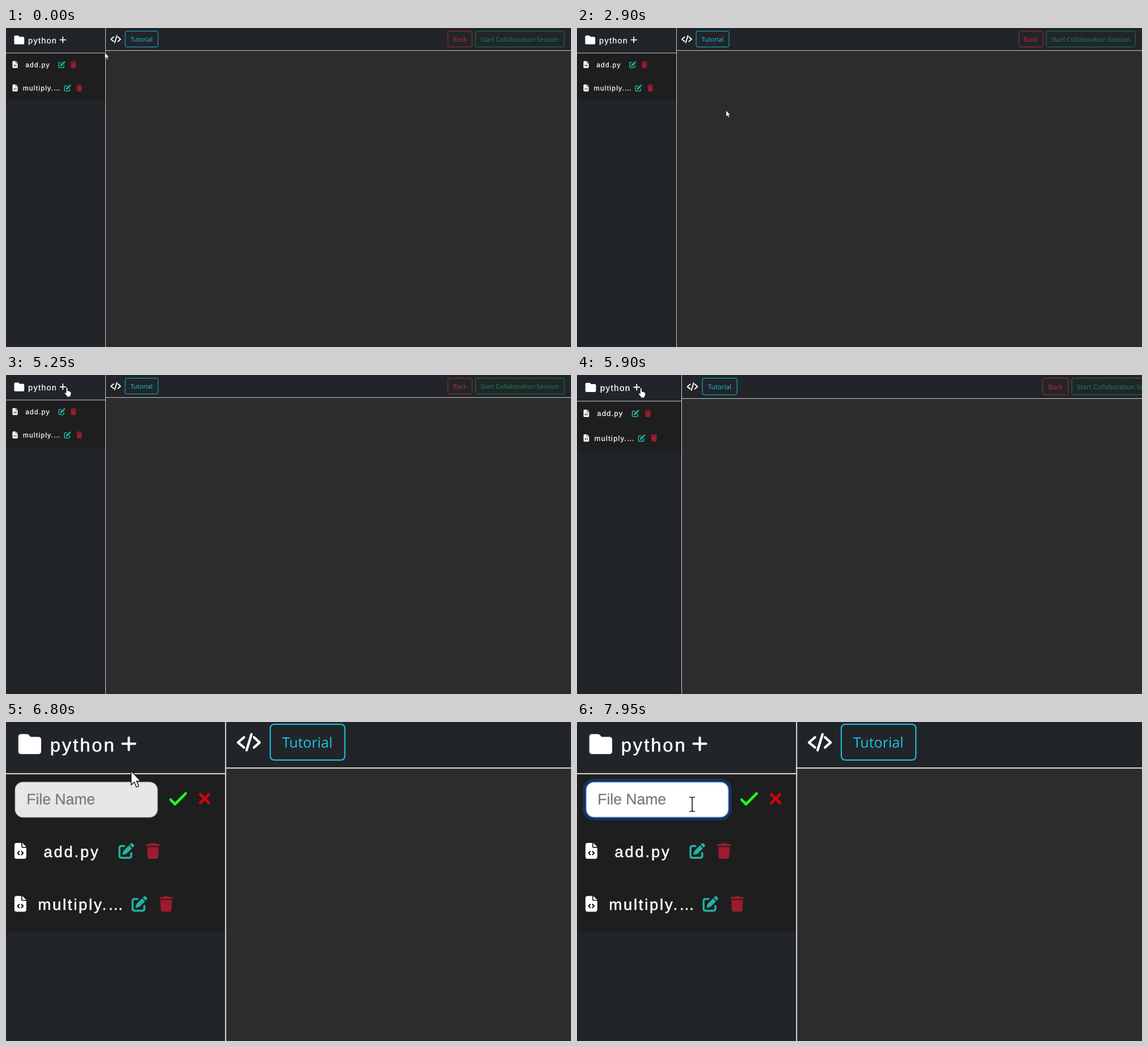
Recreate the animation shown at these times as an HTML page. Size 996 by 562 pixels, loop 8000 ms.

```html
<!DOCTYPE html>
<html lang="en">
<head>
<meta charset="utf-8">
<title>Code editor</title>
<style>
  html, body { margin: 0; width: 100%; height: 100%; overflow: hidden; background: #2d2b2c; }
  svg { display: block; width: 996px; height: 562px; }
  text { text-rendering: geometricPrecision; }
  .file, .head { fill: #fff; stroke: #fff; stroke-width: .25; }
  .file { font: 12px "Liberation Sans", Arial, sans-serif; letter-spacing: 1.25px; }
  .head { font: 14.4px "Liberation Sans", Arial, sans-serif; letter-spacing: 1.3px; }
  .hint { font: 11.7px "Liberation Sans", Arial, sans-serif; fill: #757a80; stroke: #757a80; stroke-width: .12; }
  .btn rect { fill: none; stroke: currentColor; stroke-width: .9; }
  .btn text { font: 11.05px "Open Sans", "Noto Sans", sans-serif; text-anchor: middle; fill: currentColor; }
  .line { fill: none; stroke-linecap: round; stroke-linejoin: round; }
</style>
</head>
<body>
<svg viewBox="0 0 996 562">
  <defs>
    <g id="file" transform="scale(.024)">
      <path fill="#fff" d="M0 64C0 28.7 28.7 0 64 0H224V128c0 17.7 14.3 32 32 32H384V448c0 35.3-28.7 64-64 64H64c-35.3 0-64-28.7-64-64zM384 128H256V0z"/>
      <path class="line" stroke="#1e1e1e" stroke-width="42" d="M153 275l-48 52 48 52M231 275l48 52-48 52"/>
    </g>
    <g id="edit" transform="scale(.0238)" fill="#22b2a2">
      <path d="M471.6 21.7c-21.9-21.9-57.3-21.9-79.2 0l-30.1 30 97.9 97.9 30.1-30.1c21.9-21.9 21.9-57.3 0-79.2zM172.4 241.7c-6.1 6.1-10.8 13.6-13.5 21.9l-29.6 88.8c-5 18 12 36 30.4 30.4l88.8-29.6c8.2-2.7 15.7-7.4 21.9-13.5L437.7 172.3 339.7 74.3z"/>
      <path class="line" stroke="#22b2a2" stroke-width="64" d="M192 96H96q-64 0-64 64V416q0 64 64 64H352q64 0 64-64V320"/>
    </g>
    <path id="trash" transform="scale(.0237)" fill="#9c1c2d" d="M135 18L128 32H32a32 32 0 0 0 0 64H416a32 32 0 0 0 0-64H320l-7-14Q304 0 284 0H164q-20 0-29 18zM416 128H32L53 467q4 45 48 45H347q44 0 48-45z"/>
  </defs>

  <g id="world">
    <rect width="996" height="562" fill="#2d2b2c"/>
    <rect width="996" height="39.5" fill="#212529"/>
    <rect width="175" height="562" fill="#212529"/>
    <rect id="list" y="44" width="175" height="84" fill="#1e1e1e"/>
    <g fill="#dadada">
      <rect x="174.95" width=".9" height="562"/>
      <rect x="175" y="39.2" width="821" height=".9"/>
      <rect y="43.6" width="175" height=".9"/>
    </g>

    <path transform="translate(14.4 12.2) scale(.0347)" fill="#fff" d="M64 480H448q64 0 64-64V160q0-64-64-64H288q-16 0-26-13L243 58Q224 32 192 32H64Q0 32 0 96V416q0 64 64 64z"/>
    <text class="head" x="39.1" y="26.9">python</text>
    <path class="line" stroke="#fff" stroke-width="1.8" d="M95.3 20.8H105.1M100.2 16V25.6"/>
    <path class="line" stroke="#fff" stroke-width="1.9" d="M189.7 15.8L185 19.8l4.7 3.9M195.5 13.4L191.7 25.8M197.4 15.8l4.4 4-4.4 3.9"/>

    <g class="btn" color="#1fc3e6"><rect x="210.1" y="5.7" width="57.9" height="27.7" rx="2.9"/><text x="238.8" y="23.8">Tutorial</text></g>
    <g class="btn" color="#c6283a"><rect x="779" y="5.7" width="42.6" height="27.7" rx="2.9"/><text x="800.2" y="23.8">Back</text></g>
    <g class="btn" color="#1d8555"><rect x="827.6" y="5.7" width="156.6" height="27.7" rx="2.9"/><text x="905.5" y="23.8">Start Collaboration Session</text></g>

    <g id="files">
      <use href="#file" transform="translate(11.4 58.3)"/>
      <text class="file" x="34.2" y="69.1">add.py</text>
      <use href="#edit" transform="translate(92.2 58.4)"/>
      <use href="#trash" transform="translate(113.6 58.4)"/>
      <use href="#file" transform="translate(11.4 99.4)"/>
      <text class="file" x="29.7" y="110.3">multiply.…</text>
      <use href="#edit" transform="translate(102.4 99.5)"/>
      <use href="#trash" transform="translate(123.9 99.5)"/>
    </g>

    <g id="form">
      <rect id="ring" x="9.4" y="47.9" width="115.6" height="32.5" rx="8.5" fill="#1a3256"/>
      <rect id="field" x="12.1" y="50.7" width="110.2" height="27" rx="6" stroke="#ced4da" stroke-width=".7"/>
      <text class="hint" x="20.8" y="67.7">File Name</text>
      <path id="caret" stroke="#222" stroke-width=".7" d="M21.5 57.6V70"/>
      <path class="line" stroke="#1dfb1d" stroke-width="2.1" d="M132.7 64.2l3.4 3.5 8.3-8.3"/>
      <path class="line" stroke="#c8040f" stroke-width="2.3" d="M155.8 60.1l6.6 6.6M162.4 60.1l-6.6 6.6"/>
    </g>

    <g id="cursor">
      <path id="arrow" fill="#fff" stroke="#111" stroke-width=".6" stroke-linejoin="round" d="M.3 .3V11.2L2.7 8.9l1.7 3.9 1.8-.8L4.5 8.2H7.8z"/>
      <path id="hand" transform="translate(-4.1 .2) scale(1.06 1)" fill="#fff" stroke="#111" stroke-width=".3" d="M2.9 1.4Q2.9.3 4 .3T5.1 1.4V5.9Q6.7 5.4 7 6.5 8.4 6 8.8 7.2 10.6 7 10.6 8.6V11Q10.6 13 9.4 14.4V16H4.1V14.8Q3.4 13.8.6 10.6 0 9.3 1 8.8 2 8.6 2.9 9.8z"/>
      <path id="beam" fill="none" stroke="#222" stroke-width=".75" d="M-2.2-5.5H-.8Q0-5.5 0-4.8 0-5.5.8-5.5H2.2M0-4.8V4.8M-2.2 5.5H-.8Q0 5.5 0 4.8 0 5.5.8 5.5H2.2"/>
    </g>
  </g>
</svg>
<script>
const LOOP = 8000, STEP = 50;
const OPEN = 6050, HOVER = 6900, CLICK = 7250;
const ZOOM = { start: 5850, end: 6250, scale: 2.27, x: -11, y: -8.9 };

// time, x, y of the pointer's hot spot
const path = [
  [0, 174, 43], [2100, 174, 43], [2150, 236, 57], [2300, 268, 76], [2500, 283, 97],
  [2650, 283, 97], [2900, 262.5, 145], [3350, 262.5, 145], [3400, 165.5, 174],
  [3750, 165.5, 174], [4150, 94, 155], [4250, 94, 155], [4600, 97, 143],
  [4850, 104, 33], [5100, 104, 33], [5250, 107.3, 22],
  [6650, 107.3, 22], [7000, 94.3, 67.8], [LOOP, 94.3, 67.8]
];

const el = id => document.getElementById(id);
const [world, list, files, form, ring, field, caret, cursor] =
  ["world", "list", "files", "form", "ring", "field", "caret", "cursor"].map(el);
const pointers = ["arrow", "hand", "beam"].map(el);

const part = (t, a, b) => Math.min(1, Math.max(0, (t - a) / (b - a)));
const mix = (a, b, p) => a + (b - a) * p;
const show = (node, on) => node.setAttribute("visibility", on ? "inherit" : "hidden");
const move = (node, x, y, s = 1) =>
  node.setAttribute("transform", `translate(${x} ${y}) scale(${s})`);

function pointerAt(t) {
  const i = path.findIndex(k => k[0] > t);
  const [a, b] = [path[i - 1], path[i]];
  const p = part(t, a[0], b[0]);
  return [mix(a[1], b[1], p), mix(a[2], b[2], p)];
}

function pointerKind(t, y) {
  if (t < 5200) return "arrow";
  return y < 30 ? "hand" : y < 51 ? "arrow" : "beam";
}

function draw(t) {
  const p = part(t, ZOOM.start, ZOOM.end);
  const z = p * p * (3 - 2 * p);
  move(world, ZOOM.x * z, ZOOM.y * z, mix(1, ZOOM.scale, z));

  const open = t >= OPEN;
  show(form, open);
  move(files, 0, open ? 39.5 : 0);
  list.setAttribute("height", open ? 123.2 : 84);

  const focus = part(t, CLICK, CLICK + 150);
  ring.setAttribute("opacity", focus);
  field.setAttribute("fill", t < HOVER ? "#e7e7e7" : "#fff");
  field.setAttribute("stroke", focus > .5 ? "#86b7fe" : "#ced4da");
  show(caret, t >= CLICK && t < CLICK + 500);

  const [x, y] = pointerAt(t);
  const kind = pointerKind(t, y);
  move(cursor, x, y);
  pointers.forEach(n => show(n, n.id === kind));
}

const begin = performance.now();
function tick() {
  const t = (performance.now() - begin) % LOOP;
  draw(Math.floor(t / STEP) * STEP);
  requestAnimationFrame(tick);
}
tick();
</script>
</body>
</html>
```
